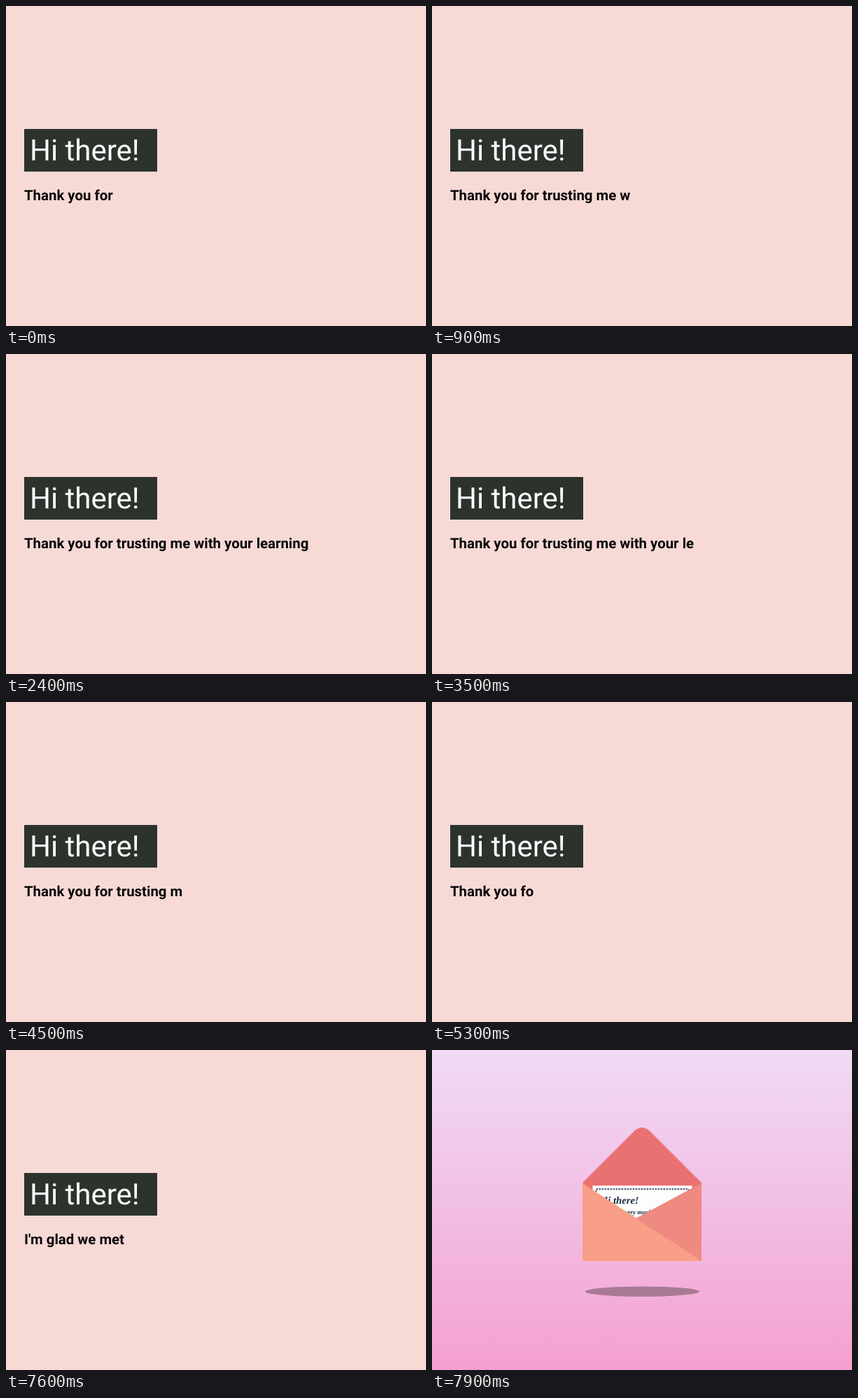
An HTML page for the animation above (8 s loop, 600 px wide and 458 px high).

```html
<!DOCTYPE html>
<html lang="en">
<head>
<meta charset="utf-8">
<title>Hi there!</title>
<style>
  html, body { margin: 0; width: 100%; height: 100%; overflow: hidden; background: #f7dad6; }
  svg { display: block; width: 100%; height: 100%; }
  text { text-rendering: geometricPrecision; white-space: pre; }
  .sans { font-family: Roboto, sans-serif; }
  .script { font-family: "Liberation Serif", serif; font-style: italic; font-weight: bold; fill: #1d2b40; }
</style>
</head>
<body>
<svg viewBox="0 0 600 458">
  <defs>
    <linearGradient id="sky" x1="0" y1="0" x2="0" y2="1">
      <stop offset="0" stop-color="#f0dbf6"/>
      <stop offset="1" stop-color="#f4a0d0"/>
    </linearGradient>
  </defs>

  <g id="greeting">
    <rect width="600" height="458" fill="#f7dad6"/>
    <rect x="26" y="176" width="190" height="61" fill="#2c332d"/>
    <text class="sans" x="34" y="221" font-size="42" fill="#fff">Hi there!</text>
    <text class="sans" id="line" x="26" y="278" font-size="20.4" font-weight="700" fill="#060606"></text>
  </g>

  <g id="letter" visibility="hidden">
    <rect width="600" height="458" fill="url(#sky)"/>
    <ellipse cx="300.3" cy="345.7" rx="81.5" ry="7.3" fill="#a87a94"/>
    <path d="M215 190L289.4 115.6Q300 106.5 310.6 115.6L385 190L300 275Z" fill="#ea7172"/>
    <rect x="229.5" y="194" width="142" height="100" fill="#fdfdfd"/>
    <rect x="234.5" y="199" width="132" height="90" fill="none" stroke="#1d2b40" stroke-width="1.3" stroke-dasharray="2.6 1.4"/>
    <text class="script" x="240" y="220" font-size="14.6">Hi there!</text>
    <text class="script" x="233" y="235" font-size="9" font-weight="400">Thank you very much for</text>
    <path d="M215 190.5L385 302H215Z" fill="#f99e87"/>
    <path d="M385 190.5L291 241L385 302Z" fill="#ef8a80"/>
  </g>
</svg>
<script>
  const LOOP = 8000;
  const LETTER_AT = 7900;
  const FIRST = "Thank you for trusting me with your learning";
  const SECOND = "I'm glad we met";

  // Each phase starts at a time and steps one character per interval (ms).
  const TYPE_FIRST = { start: -893, step: 66 };
  const ERASE = { start: 3035, step: 70 };
  const TYPE_SECOND = { start: 6115, step: 73 };

  const line = document.getElementById("line");
  const letter = document.getElementById("letter");
  const steps = (phase, t) => Math.max(0, Math.floor((t - phase.start) / phase.step));

  function typed(t) {
    if (t >= TYPE_SECOND.start) return SECOND.slice(0, steps(TYPE_SECOND, t));
    const shown = Math.min(FIRST.length, steps(TYPE_FIRST, t)) - steps(ERASE, t);
    return FIRST.slice(0, Math.max(0, shown));
  }

  function draw(t) {
    line.textContent = typed(t);
    letter.setAttribute("visibility", t >= LETTER_AT ? "visible" : "hidden");
  }

  const origin = performance.now();
  function tick() {
    draw((performance.now() - origin) % LOOP);
    requestAnimationFrame(tick);
  }
  tick();
</script>
</body>
</html>
```
